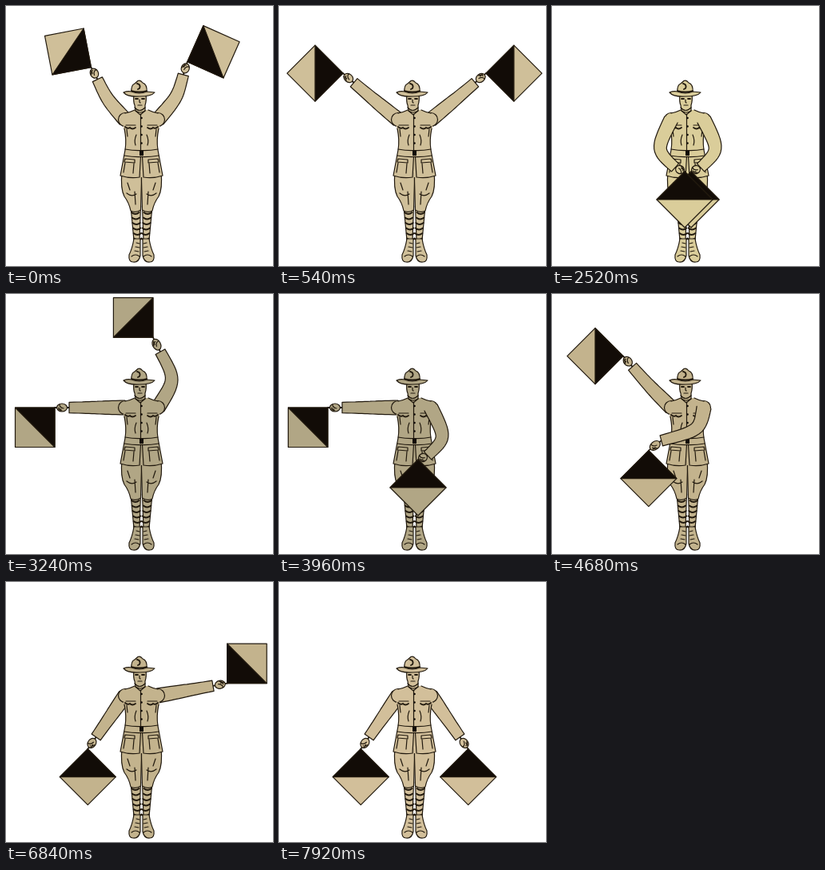
These frames come from a looping animation (334 px wide and 325 px high, 8 s). An HTML page:

```html
<!DOCTYPE html>
<html lang="en">
<head>
<meta charset="utf-8">
<title>Semaphore</title>
<style>
html, body { margin: 0; width: 100%; height: 100%; overflow: hidden; background: #fff; }
svg { display: block; width: 100vw; height: 100vh; }
.ink { fill: none; stroke: #21190e; stroke-width: 1.2; stroke-linecap: round; stroke-linejoin: round; }
.bold { stroke-width: 1.8; }
.dark { fill: #120c07; }
.tan { fill: var(--tan); }
</style>
</head>
<body>
<svg id="stage" viewBox="0 0 334 325"></svg>
<script>
const LOOP = 8000, WAVE = 180, LETTER = 360, PAUSE = 720;
const FLAG = 70, SHOULDER_Y = 142;
const stage = document.getElementById('stage');

// Positions: 0 hangs in front, 1 to 7 go clockwise from low left.
// Each letter names the position of the left, then the right arm.
const CODE = {
  A: '10', B: '20', C: '30', D: '40', E: '05', H: '21', I: '31',
  L: '15', M: '16', N: '17', O: '32', P: '24', T: '34', U: '35'
};
const ARM_DEG = [90, 125, 180, -133, -90, -52, -10, 55];
const FLAG_DEG = [90, 90, 135, 180, -90, 0, -45, 90];
const TONE = { T: '#aa9d76', D: '#a59978', P: '#b1a685', B: '#b1a685', N: '#d2bf9a' };

const rad = deg => deg * Math.PI / 180;
const path = (d, cls = '') => `<path class="ink ${cls}" d="${d}"/>`;
const solid = d => path(d, 'tan');
const poly = pts => 'M' + pts.map(p => p.map(v => v.toFixed(1)).join(' ')).join('L');
const mix = (a, b, t) => a.map((v, i) => v + (b[i] - v) * t);
const go = ([x, y], deg, d) => [x + Math.cos(rad(deg)) * d, y + Math.sin(rad(deg)) * d];
const add = ([x, y], dx, dy) => [x + dx, y + dy];
const shoulder = side => [169.5 + side * 20.5, SHOULDER_Y];

function flag(near, deg) {
  const mid = go(near, deg, FLAG / 2), far = go(near, deg, FLAG);
  const p = go(mid, deg - 90, FLAG / 2), q = go(mid, deg + 90, FLAG / 2);
  return solid(poly([near, p, far, q]) + 'Z') + path(poly([near, p, q]) + 'Z', 'dark');
}

// Tapered sleeve along a cubic that passes through the elbow
function sleeve(s, elbow, wrist) {
  const k = elbow.map((v, i) => (8 * v - s[i] - wrist[i]) / 6);
  const one = [], two = [];
  for (let t = 0; t <= 1; t += 1 / 16) {
    const a = mix(mix(s, k, t), k, t), b = mix(k, mix(k, wrist, t), t);
    const deg = Math.atan2(b[1] - a[1], b[0] - a[0]) * 180 / Math.PI;
    const p = mix(a, b, t), w = 9 - 2.3 * t;
    one.push(go(p, deg + 90, w));
    two.unshift(go(p, deg - 90, w));
  }
  return solid(poly([...one, ...two]));
}

function hand(wrist, near) {
  const [dx, dy] = add(near, -wrist[0], -wrist[1]);
  const [x, y] = mix(wrist, near, .5);
  const r = Math.max(5.5, Math.hypot(dx, dy) * .36);
  return path(poly([wrist, near]), 'bold') +
    `<g transform="translate(${x} ${y}) rotate(${Math.atan2(dy, dx) * 180 / Math.PI})">` +
    `<ellipse class="ink tan" rx="${r}" ry="5"/>` + path('M0-4Q4-3 4 0M-2-1Q3 0 3 4M1-2L5-2') + '</g>';
}

const draw = (s, elbow, wrist, near, deg) =>
  flag(near, deg) + hand(wrist, near) + sleeve(s, elbow, wrist);

// Stretched arm; it bows outwards only when nearly upright
function reach(side, deg, flagDeg, len = 88 - 8 * Math.max(0, Math.sin(rad(deg)))) {
  const s = shoulder(side), bow = 20 * side * Math.max(0, -Math.sin(rad(deg))) ** 8;
  const near = go(s, deg, len), wrist = add(go(near, deg, -18), bow * .4, 0);
  return draw(s, add(mix(s, wrist, .5), bow * .8, 0), wrist, near, flagDeg);
}

// Arm bent in front of the body
function fold(side, near, wrist, flagDeg) {
  const s = shoulder(side);
  return draw(s, add(mix(s, wrist, .5), side * 16, 6), wrist, near, flagDeg);
}

function arm(side, pos) {
  const deg = ARM_DEG[pos], turn = FLAG_DEG[pos];
  if (pos === 0) {
    const near = [170 + side * 4, 207];
    return { front: fold(side, near, add(near, side * 12, -5), turn) };
  }
  if (side > 0 && pos < 3) {
    const s = shoulder(side), near = mix(s, go(shoulder(-1), deg, 85), .77);
    return { front: fold(side, near, mix(near, s, .23), turn) };
  }
  const up = pos === 4 ? side : 0;
  return { back: reach(side, deg - 4 * up, turn - 45 * up) };
}

function half() {
  let s = solid('M156 250L160 293H167L168.5 250Z');
  for (let y = 258; y < 291; y += 6.5)
    s += path(`M${157 + (y - 258) / 10} ${y}q5 4 9.5 0`, 'bold');
  return s +
    solid('M160 291Q158 303 154 311Q153 320 159 320Q166 321 168 312V291Z') +
    path('M163 296l4 1M162 301l5 1M161 306l5 1M157 313Q162 309 167 313') +
    solid('M145 208Q143 228 148 238Q154 246 156 256Q162 259 168.5 255L169.5 219V208Z') +
    path('M161 232l1 16M151 234Q157 239 163 235M152 221l3 9') +
    '<path class="tan" d="M161 130L150 134L147 151Q151 166 149 180L143 212Q155 216 170 214V130Z"/>' +
    path('M161 130Q155 133 149 134M148 153Q151 167 149 180L143 212Q155 216 167 214L168.5 188') +
    path('M149 151q3 3 6 1q3 3 7 0', 'bold') +
    path('M150 149h12M151 154l1 9M163 161Q160 168 162 174M149 179Q160 181 170 180.5M148 187Q160 189 170 188.5') +
    path('M149 191l12 1v4l-13-1ZM149 196l-2 12M160 197l-1 12');
}

const both = s => s + `<g transform="translate(339 0) scale(-1 1)">${s}</g>`;
const joint = `<circle class="ink tan" cx="149" cy="${SHOULDER_Y}" r="8.5"/>`;

let buttons = path('M168.5 135v45') + '<rect class="dark" x="167" y="181" width="5" height="6"/>';
for (let y = 140; y < 175; y += 10.5)
  buttons += `<circle class="dark" cx="169.5" cy="${y}" r="1.3"/>`;

const head =
  solid('M160 110Q159 120 161 124L162 131Q168 135 174 131V124Q176 118 175 110Z') +
  path('M161 127Q167 134 174 127M162 131l6 5l6-5M167 117v3l1 1M165 124h5') +
  path('M162 116h3M170 116h3', 'bold') +
  solid('M157 108Q156 99 161 97L165 93.5Q168 92 171 96Q177 98 176 108Z') +
  solid('M147 108Q152 106 157 107Q167 111 176 107L186 108Q182 113 167 113Q152 114 147 108Z') +
  path('M164 97Q169 98 167 103L165 104M157 106Q167 109 176 106', 'bold');

const body = both(joint) + both(half()) + buttons + head;
const steps = [];
let now = 0;

function pose(ms, tan, left, right) {
  const g = document.createElementNS('http://www.w3.org/2000/svg', 'g');
  g.style.setProperty('--tan', tan);
  g.innerHTML = [right.back, left.back, body, right.front, left.front].join('');
  stage.append(g);
  steps.push({ g, from: now, to: now += ms });
}

const sign = ([l, r], ms, tan) => pose(ms, tan, arm(-1, +l), arm(1, +r));
const wave = (left, right) =>
  pose(WAVE, '#cfbf99', { back: reach(-1, ...left) }, { back: reach(1, ...right) });

for (let i = 0; i < 2; i++) {
  wave([-123, -146, 78], [-63, -21, 81]);
  wave([-140, 180, 90], [-40, 0, 90]);
}
for (const word of ['THE', 'PUBLIC', 'DOMAIN']) {
  sign('00', PAUSE, '#dacd9a');
  for (const c of word) sign(CODE[c], LETTER, TONE[c] || '#c3b38d');
}

function show(ms) {
  const t = ms % LOOP;
  for (const { g, from, to } of steps)
    g.style.display = t >= from && t < to ? '' : 'none';
}
let start;
function tick(ms) {
  start ??= ms;
  show(ms - start);
  requestAnimationFrame(tick);
}
show(0);
requestAnimationFrame(tick);
</script>
</body>
</html>
```
